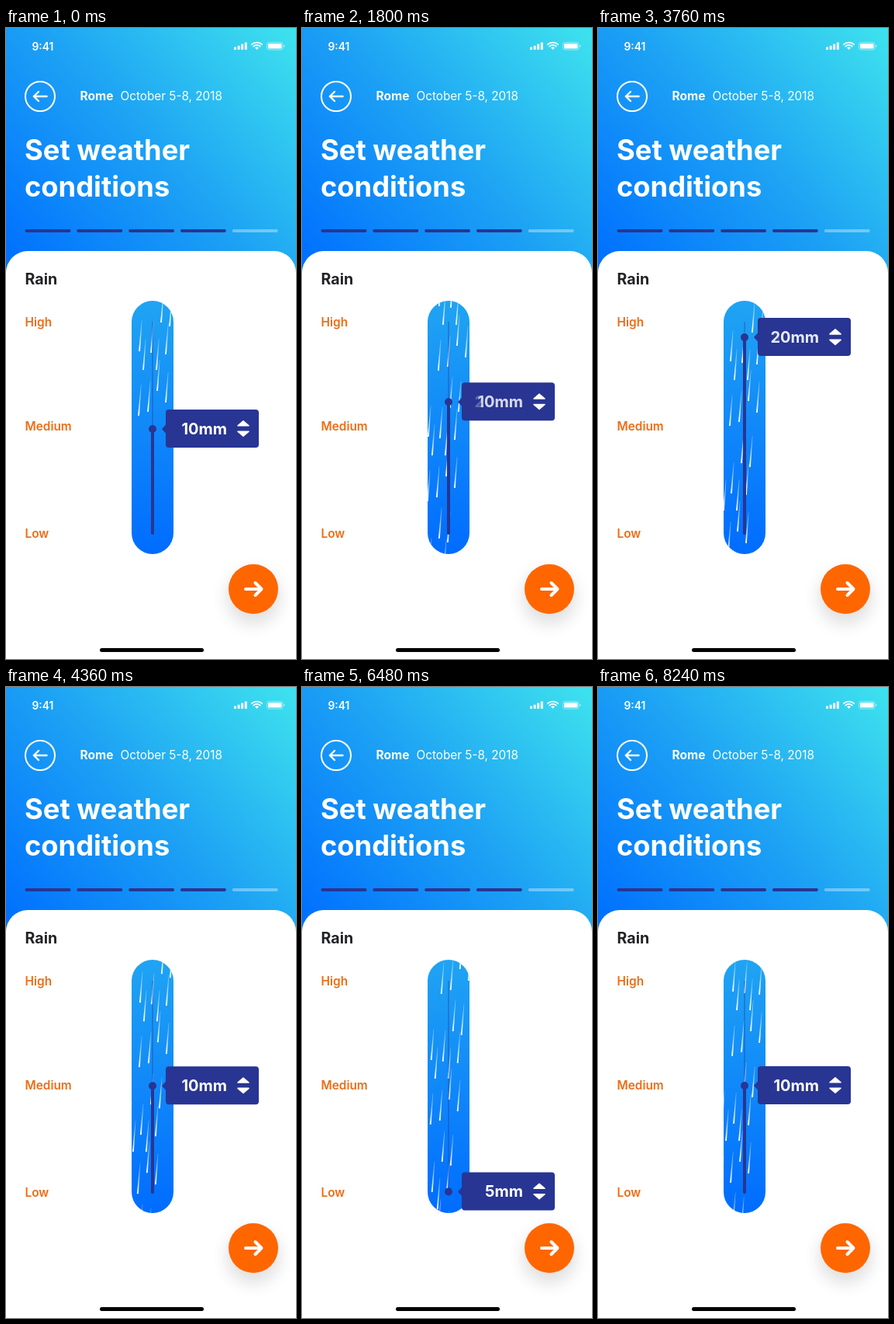
Recreate the animation shown at these times as an HTML page. Size 374x812 px, loop 8.28 s.

```html
<!DOCTYPE html>
<html lang="en">
<head>
<meta charset="utf-8">
<title>Set weather conditions</title>
<style>
  html, body { margin: 0; width: 100%; height: 100%; overflow: hidden; background: #fff; }
  svg { display: block; width: 374px; height: 812px; font-family: Inter, "Open Sans", sans-serif; }
  .title { font-size: 36.3px; font-weight: 700; }
  .label { font-size: 15.4px; font-weight: 600; fill: #ef6c12; }
  .value { font-size: 20px; font-weight: 700; fill: #fff; text-anchor: end; }
  .line { fill: none; stroke: #fff; stroke-linecap: round; stroke-linejoin: round; }
</style>
</head>
<body>
<svg viewBox="0 0 374 812">
  <defs>
    <linearGradient id="sky" gradientUnits="userSpaceOnUse" x1="20" y1="315" x2="360" y2="0">
      <stop offset="0" stop-color="#0070ff"/>
      <stop offset=".5" stop-color="#1da2f4"/>
      <stop offset="1" stop-color="#3de0ee"/>
    </linearGradient>
    <linearGradient id="water" x1="0" y1="0" x2="0" y2="1">
      <stop offset="0" stop-color="#20a4f3"/>
      <stop offset="1" stop-color="#006cff"/>
    </linearGradient>
    <linearGradient id="drop" x1="0" y1="0" x2="0" y2="1">
      <stop offset="0" stop-color="#fff" stop-opacity=".25"/>
      <stop offset="1" stop-color="#fff"/>
    </linearGradient>
    <clipPath id="tube"><rect x="162" y="351" width="54" height="326" rx="27"/></clipPath>
    <filter id="soft" x="-50%" y="-50%" width="200%" height="200%">
      <feGaussianBlur stdDeviation="11"/>
    </filter>
    <path id="streak" fill="url(#drop)" d="M2.9-40h.7L1-.6Q0 .6-.9-.6Z"/>
    <g id="tile"></g>
  </defs>

  <rect width="374" height="330" fill="url(#sky)"/>

  <g fill="#fff">
    <text x="33.5" y="28.5" font-size="13.8" font-weight="600">9:41</text>
    <rect x="294" y="24.5" width="3" height="3.5" rx=".8"/>
    <rect x="298.6" y="22.8" width="3" height="5.2" rx=".8"/>
    <rect x="303.2" y="20.6" width="3" height="7.4" rx=".8"/>
    <rect x="307.8" y="18.5" width="3" height="9.5" rx=".8"/>
    <path d="M323.5 28l-2.4-2.5a3.5 3.5 0 0 1 4.8 0Z"/>
    <path class="line" stroke-width="1.8" stroke-linecap="butt" d="M319.2 23.7a6.2 6.2 0 0 1 8.6 0M316.9 21.2a9.6 9.6 0 0 1 13.2 0"/>
    <rect x="336.5" y="18.5" width="20.5" height="9.6" rx="2.6" fill="none" stroke="#fff" stroke-opacity=".45"/>
    <rect x="338" y="20" width="17.5" height="6.6" rx="1.4"/>
    <path opacity=".5" d="M358 21.6q1.5.4 1.5 1.7t-1.5 1.7Z"/>

    <circle class="line" cx="44" cy="88" r="19" stroke-width="2"/>
    <path class="line" stroke-width="2.4" d="M52.5 88H36M42 82l-6.2 6 6.2 6"/>
    <text x="95.5" y="93" font-size="15.5" font-weight="700">Rome</text>
    <text x="147.5" y="93" font-size="15.3">October 5-8, 2018</text>
    <text class="title" x="24" y="169.5">Set weather</text>
    <text class="title" x="24" y="216.5">conditions</text>
  </g>
  <g id="steps"></g>

  <path fill="#fff" d="M0 812V315a28 28 0 0 1 28-28H346a28 28 0 0 1 28 28V812Z"/>
  <text x="24.5" y="330" font-size="19.6" font-weight="700" fill="#222327">Rain</text>
  <text class="label" x="24.5" y="384">High</text>
  <text class="label" x="24.5" y="518">Medium</text>
  <text class="label" x="24.5" y="656">Low</text>

  <g clip-path="url(#tube)">
    <rect x="162" y="351" width="54" height="326" fill="url(#water)"/>
    <g id="rain"></g>
  </g>

  <path stroke="#283593" stroke-opacity=".6" d="M189 378V650"/>
  <path id="bar" stroke="#283593" stroke-width="4" stroke-linecap="round"/>
  <g id="handle">
    <circle cx="189" r="5" fill="#283593"/>
    <path fill="#283593" d="M201 0l6-6.5v13Z"/>
    <rect x="206" y="-25" width="120" height="49" rx="4" fill="#283593"/>
    <text class="value" x="285" y="6.7">20mm</text>
    <text class="value" x="285" y="6.7">10mm</text>
    <text class="value" x="285" y="6.7">5mm</text>
    <path class="line" style="fill:#fff" stroke-width="1.6" d="M299 -4.2L306 -10.2L313 -4.2ZM299 3.2L306 9.2L313 3.2Z"/>
  </g>

  <circle cx="319" cy="733" r="34" fill="#000" opacity=".13" filter="url(#soft)"/>
  <circle cx="319" cy="722" r="32" fill="#ff6600"/>
  <path class="line" stroke-width="4" d="M309 722H329M321.5 714l8 8-8 8"/>
  <rect x="121" y="798" width="134" height="5" rx="2.5"/>
</svg>
<script>
  const LOOP = 8280, STEP = 40, TILE = 168, SLANT = 1 / 12;
  const HIGH = 382, SPAN = 134, LOW = 650;

  // Tips of the streaks in one repeat of the rain.
  const TIPS = [[200, 379], [211, 384], [172, 416], [187, 418], [206, 420], [177, 440],
    [194, 440], [195, 467], [206, 482], [183, 494], [171, 499]];

  // [time, handle y], eased between entries
  const SLIDE = [[0, 516], [1460, 516], [2480, HIGH], [3500, HIGH], [5240, 649],
    [6480, 649.5], [8000, 513], [LOOP, 513]];
  // [time, distance fallen]
  const FALL = [[0, 0], [1800, 950], [2600, 1329], [3760, 1861], [5200, 2613],
    [6480, 3256], [8240, 4176], [LOOP, 4197]];

  const $ = id => document.getElementById(id);
  const add = (parent, tag, attrs) => {
    const el = document.createElementNS('http://www.w3.org/2000/svg', tag);
    for (const key in attrs) el.setAttribute(key, attrs[key]);
    return parent.appendChild(el);
  };
  const linear = p => p;
  const smooth = p => p * p * (3 - 2 * p);

  function at(keys, t, ease) {
    const i = Math.max(1, keys.findIndex(k => k[0] >= t));
    const [t0, a] = keys[i - 1], [t1, b] = keys[i];
    return a + (b - a) * ease((t - t0) / (t1 - t0));
  }

  for (let i = 0; i < 5; i++) {
    add($('steps'), 'rect', { x: 24.5 + i * 66.8, y: 259, width: 59, height: 4, rx: 2,
      fill: i < 4 ? '#283593' : '#fff', opacity: i < 4 ? 1 : 0.35 });
  }
  for (const [x, y] of TIPS) {
    add($('tile'), 'use', { href: '#streak', transform: `translate(${x} ${y})` });
  }
  const tiles = [-1, 0, 1].map(() => add($('rain'), 'use', { href: '#tile' }));
  const values = document.querySelectorAll('.value');

  function draw(t) {
    const y = at(SLIDE, t, smooth);
    $('handle').setAttribute('transform', `translate(0 ${y})`);
    $('bar').setAttribute('d', `M189 ${y}V${LOW}`);
    values.forEach((el, i) => {
      const off = Math.abs((y - HIGH) / SPAN - i);
      el.setAttribute('opacity', Math.max(0, 1 - off));
    });

    const fallen = at(FALL, t, linear);
    tiles.forEach((el, i) => {
      const d = fallen % TILE + (i - 1) * TILE;
      el.setAttribute('transform', `translate(${-d * SLANT} ${d})`);
      // The first repeat has nothing ahead of it.
      el.setAttribute('visibility', d > fallen ? 'hidden' : 'visible');
    });
  }

  const start = performance.now();
  function tick() {
    const t = (performance.now() - start) % LOOP;
    draw(Math.floor(t / STEP) * STEP);
    requestAnimationFrame(tick);
  }
  tick();
</script>
</body>
</html>
```
